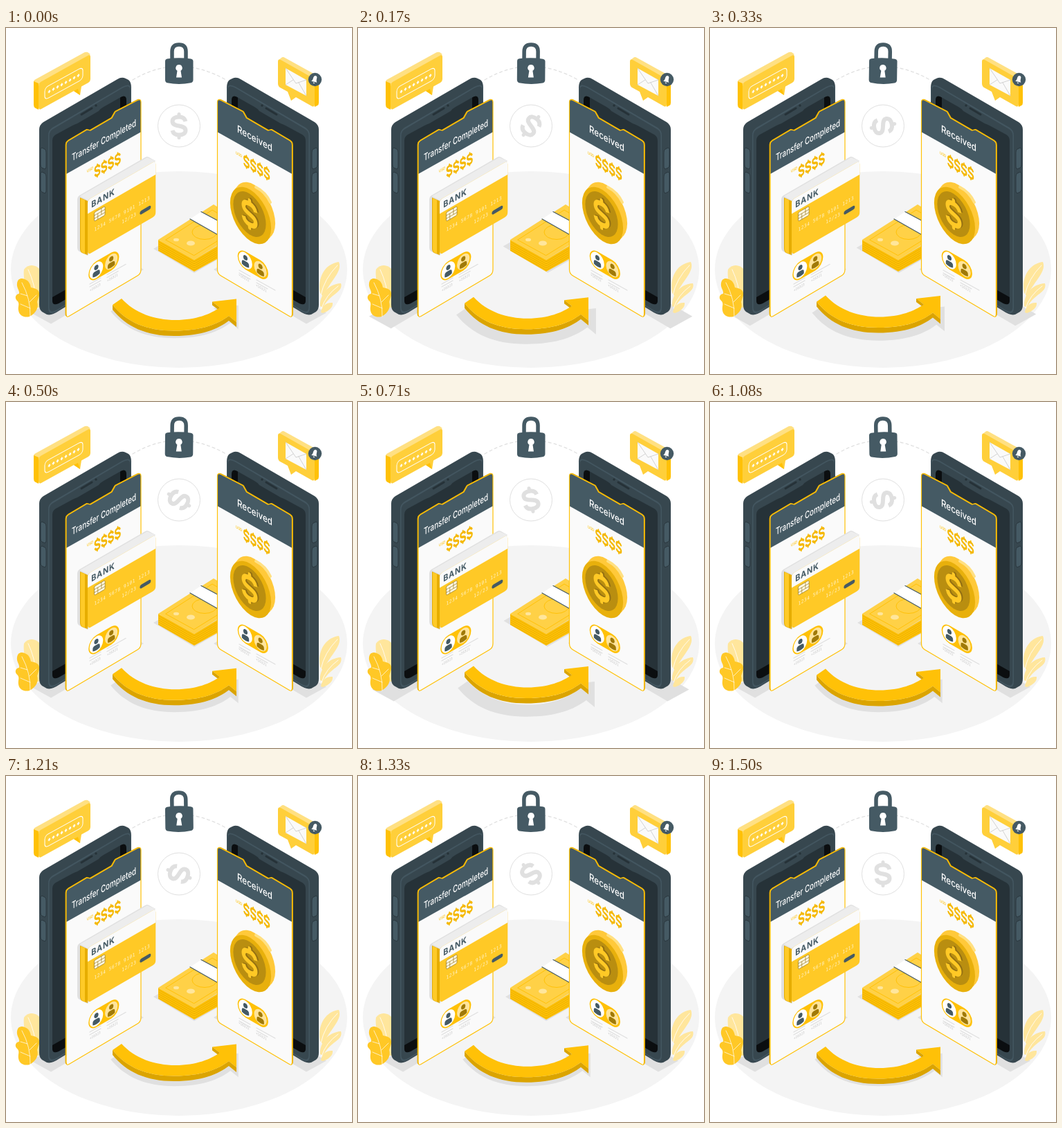
Write an HTML page that moves like this. It is 500x500 px and loops after 1540 ms.

```html
<!DOCTYPE html>
<html lang="en">
<head>
<meta charset="utf-8">
<title>Money transfer</title>
<style>
html, body { margin: 0; width: 100%; height: 100%; overflow: hidden; background: #fff; }
svg { display: block; width: 100vw; height: 100vh; }
text { font-family: Inter, Roboto, sans-serif; font-weight: 500; }
.mono text { font-family: "DejaVu Sans Mono", monospace; font-weight: 400; }
.y { fill: #ffc107; }
.light { fill: #ffcf3a; }
.dk { fill: #455a64; }
.line { fill: none; stroke-linecap: round; stroke-linejoin: round; }
</style>
</head>
<body>
<svg viewBox="0 0 500 500" xmlns="http://www.w3.org/2000/svg">
<defs>
  <g id="dollar" class="line" stroke-width="6">
    <path d="M9.5 -6.5C8.3 -11.5 4.5 -13 0 -13C-6 -13 -9.5 -10.5 -9.5 -6.6C-9.5 -2 -5 -1 0 0C5 1 9.5 2 9.5 6.6C9.5 10.5 6 13 0 13C-4.5 13 -8.3 11.5 -9.5 6.5" stroke-linecap="butt"/>
    <path d="M0 -17V-13M0 13V17" stroke-width="5"/>
  </g>

  <g id="phone">
    <path fill="#37474f" d="M48 147Q48 140 54 136L161 74Q167 70 173 73L177 75Q181 78 181 86V345L76 409Q66 416 59 414L52 410Q48 407 48 400Z"/>
    <path fill="#435660" d="M61 155Q61 148 67 144L168 85Q181 78 181 90V340L74 409Q61 417 61 404Z"/>
    <path fill="#37474f" d="M62.500 156Q62.500 149 68 146L168 87Q180 80 180 91V340L74 407Q62.500 414 62.500 403Z"/>
    <path fill="#263238" d="M67 163Q67 157 72 154L96 141Q100 139 103 138L134 120Q137 116 141 114L164 101Q174 95 174 105V340L76 398Q67 402 67 394Z"/>
    <path fill="#0b0e10" d="M165 100.500Q174 95 174 105V120H165ZM67 389L90 376V390L76 398Q67 402 67 394Z"/>
    <path class="line" stroke="#263238" stroke-width="3" d="M109 125L124 116"/>
    <circle cx="130" cy="112" r="1.700" fill="#263238"/>
    <g fill="#455a64" stroke="#263238" stroke-width=".8">
      <path d="M50 176Q50 172 54 174L56 175Q58 176 58 180V200Q58 205 54 203L52 202Q50 201 50 198Z"/>
      <path d="M50 211Q50 207 54 209L56 210Q58 211 58 215V235Q58 240 54 238L52 237Q50 236 50 233Z"/>
    </g>
  </g>

  <path id="sheet" d="M87 169Q87 165 90 163L117 147L122 148L153 130L158 121L190 104.500Q195 102 195 107V349Q195 355 190 358L91 416.500Q87 419 87 413Z"/>
  <clipPath id="cut"><use href="#sheet"/></clipPath>
  <g id="panel">
    <use href="#sheet" fill="#e0a800" stroke="#e0a800" transform="translate(-.9 -.5)"/>
    <use href="#sheet" fill="#fafafa"/>
    <path class="dk" clip-path="url(#cut)" d="M80 90H200V147.500L80 215Z"/>
    <use href="#sheet" fill="none" stroke="#ffc107" stroke-width="1.200"/>
  </g>

  <g id="bust">
    <circle cy="-4" r="3.600"/>
    <path d="M-6 7.500V4.500Q-6 1 -2.500 1H2.500Q6 1 6 4.500V7.500Q0 10 -6 7.500Z"/>
  </g>
  <g id="pair">
    <rect class="y" x="-13" y="-13" width="51" height="26" rx="13"/>
    <circle r="11.300" fill="#fff"/>
    <circle cx="25" r="10.500" fill="#ffe49a"/>
    <use href="#bust" class="dk"/>
    <use href="#bust" x="25" fill="#a07a08"/>
  </g>

  <path id="arrow" d="M154 400L167 391C186 412 215 422 245 422C275 422 296 413 309 404L298 395.500L333 391.500V425L322 416C306 428 283 437.500 243 437.500C203 437.500 174 425 154 400Z"/>
</defs>

<ellipse cx="250" cy="349" rx="243" ry="142" fill="#f4f4f4"/>
<path class="line" stroke="#e0e0e0" stroke-width="1.300" stroke-dasharray="4 4" d="M183 75Q249 36 318 75"/>

<g id="shade" fill="#e0e0e0">
  <path id="foot" d="M463 411.500L434 427.500L300 349L327 333Z"/>
  <use href="#foot" transform="matrix(-1 0 0 1 499 0)"/>
  <path d="M213 319L272 354L331 320L272 285Z"/>
  <use href="#arrow" transform="matrix(1.030 0 0 1.030 -7.300 -2.500)"/>
</g>

<!-- plants -->
<path fill="#ffe69c" d="M26 349C31 341 43 341 49 349V404H37C31 390 24 362 26 349Z"/>
<path class="line" stroke="#fff" stroke-width=".8" d="M32 349Q42 370 44 395"/>
<g fill="#ffe69c">
  <path d="M454 383C450 361 460 341 481 338C487 352 468 366 458 388Z"/>
  <path d="M454 402C453 386 465 370 484 369C488 382 468 384 458 404Z"/>
  <path d="M455 411C456 402 463 396 472 397C473 404 466 409 458 412Z"/>
</g>
<path class="line" stroke="#fff" stroke-width=".8" d="M479 343Q460 362 455 386M480 373Q462 386 456 405"/>

<use href="#phone"/>
<use href="#phone" transform="matrix(-1 0 0 1 500 0)"/>
<path fill="#ffc826" d="M34 417C27 419 19 416 18 408C17 402 20 399 17 395C12 391 13 385 19 384C20 379 15 376 16 369C17 362 22 361 27 363C33 365 35 370 36 375C40 376 44 376 47 380C50 386 46 391 45 396C47 403 45 411 34 417Z"/>
<path class="line" stroke="#fff" stroke-width=".7" d="M23 368Q36 392 35 417M31 387L21 384M34 396L44 386M35 405L21 399"/>

<!-- cash -->
<path class="y" d="M220 306L272 335L330 300V320L272 352L220 322Z"/>
<path id="edges" class="line" stroke="#e8ae00" stroke-width=".9"/>
<path fill="#ffd147" d="M220 306L300 255L350 286L272 335Z"/>
<g class="line" stroke="#ffc107">
  <path d="M231 306L298 263L339 287L272 328.500Z"/>
  <ellipse cx="287" cy="295" rx="18" ry="10.500"/>
</g>
<ellipse cx="267" cy="311" rx="6" ry="3.600" fill="#ffe69c"/>
<ellipse cx="246" cy="306" rx="4" ry="2.300" fill="#ffe69c"/>
<path fill="#fff" d="M266 276L282 265.500L322 287V308Z"/>
<path class="line" stroke="#455a64" stroke-width="1.200" d="M266 276L310 301M282 265.500L310 280.500"/>

<use href="#panel"/>
<use href="#panel" transform="matrix(-1 0 0 1 500.500 0)"/>
<g fill="#fff" text-anchor="middle" style="font-stretch:condensed">
  <text font-size="14" transform="matrix(.7 -.385 0 1 141.500 167)">Transfer Completed</text>
  <text font-size="14.500" transform="matrix(.8 .45 0 1 359.500 164.500)">Received</text>
</g>
<g class="y" font-size="5.500">
  <text transform="matrix(.8 -.45 0 1 117 209)">USD</text>
  <text transform="matrix(.8 .45 0 1 332 182)">USD</text>
</g>
<g id="sums" stroke="#f5b800"></g>
<use href="#pair" transform="matrix(.866 -.5 0 1 130.500 350)"/>
<use href="#pair" transform="matrix(.866 .5 0 1 346 336)"/>
<path class="line" stroke="#e0e0e0" stroke-width="1.400" d="M121 370L137 361M121 374L137 365M146 356.500L173 341.500M146 360.500L162 351.500M337 350L353 359M337 354L353 363M362 364L389 379M362 368L378 377"/>
<g class="mono" fill="#c4c4c4" font-size="5">
  <text transform="matrix(.866 -.5 0 1 121 381)">+16323</text>
  <text transform="matrix(.866 -.5 0 1 146 367)">+16321</text>
  <text transform="matrix(.866 .5 0 1 336 358)">+16322</text>
  <text transform="matrix(.866 .5 0 1 361 373)">+16321</text>
</g>

<!-- bank card -->
<path fill="#e0e0e0" d="M103 247Q103 244 106 242L201 187Q204 185 207 187L216 192L118 329L106 323Q103 321 103 318Z"/>
<path fill="#ededed" d="M107 243L204 187L216 192L118 249Z"/>
<path fill="#e6ad00" d="M107 245L118 250V328L110 325Q107 323 107 319Z"/>
<path fill="#ffca28" d="M108 246L114 248.500V326L110 324.500Q108 323 108 319Z"/>
<g transform="matrix(.866 -.5 0 1 118 248.500)">
  <rect fill="#ffc926" width="113.500" height="79.500" rx="5"/>
  <path fill="#fafafa" d="M0 20V5Q0 0 5 0H108.500Q113.500 0 113.500 5V20Z"/>
  <text class="dk" x="6" y="14.500" font-size="12.500" letter-spacing=".9" style="font-weight:700">BANK</text>
  <g fill="#fff8e1" stroke="#8a6d14" stroke-width=".6">
    <rect x="11" y="23.500" width="18" height="13" rx="2"/>
    <path fill="none" d="M11 28H29M11 32.500H29M17 28V36.500M23 23.500V32.500"/>
  </g>
  <g class="mono" fill="#fff3cd" font-size="7" letter-spacing=".7">
    <text x="11" y="51">1234 5678 9101 1213</text>
    <text x="57" y="63">12/23</text>
  </g>
  <rect class="dk" x="87" y="60" width="18.500" height="5.500" rx="2.700"/>
</g>

<!-- gold coin -->
<g>
  <circle r="37" fill="#ffc93a" transform="matrix(.8 .5 0 1 359.500 264)"/>
  <circle r="37" fill="#ffc93a" transform="matrix(.8 .5 0 1 356.500 267.500)"/>
  <path class="line" stroke="#ffe082" stroke-width="4" stroke-linecap="butt" d="M361 230Q375 237 382 252"/>
  <circle r="37" fill="#e8b00c" transform="matrix(.8 .5 0 1 353.500 271)"/>
  <g transform="matrix(.8 .5 0 1 352 269)">
    <circle r="29.500" fill="#b98e10"/>
    <use href="#dollar" stroke="#947012" transform="translate(2.500 -2) scale(1.150)"/>
    <use href="#dollar" stroke="#ffc926" transform="scale(1.150)"/>
  </g>
</g>

<g id="float">
  <path fill="#dba400" d="M154 400C174 425 203 437.500 243 437.500C283 437.500 306 428 322 416L333 425V432L322 423C306 435 283 445 243 445C203 445 174 432 154 407Z"/>
  <use href="#arrow" class="y"/>
  <path fill="#dba400" d="M298 395.500L309 404L306 406.500L298 400.500Z"/>
</g>

<!-- password bubble -->
<path fill="#ffe082" d="M40 78Q40 75 43 74L112 36Q115 34 118 35L122 38L47 82Z"/>
<path class="y" d="M40 77L47 80V118L42 115.500Q40 114 40 111Z"/>
<path class="light" d="M47 84Q47 80 50 78L118 40Q122 37 122 42V74Q122 77 119 79L109 84.500L107 97L98 91L51 117Q47 119 47 114Z"/>
<path class="y" d="M98 91L107 97L104 88Z"/>
<g transform="matrix(1 -.55 0 1 47 79)">
  <rect x="9" y="12.500" width="55" height="17.500" rx="5" fill="none" stroke="#fff"/>
  <path id="stars" class="line" stroke="#fff"/>
</g>

<!-- mail bubble -->
<path fill="#ffe082" d="M393 47L398 43Q400 41 403 43L450 69Q452 70 452 73L446 78Z"/>
<path class="y" d="M446 76L452 72V108Q452 111 450 112L446 114Z"/>
<path class="light" d="M393 49Q393 44 397 46L443 72Q446 74 446 78V110Q446 115 442 113L419 100L412 105L407 92L396 86Q393 84 393 80Z"/>
<path fill="#fafafa" d="M404 58L434 75V98L404 82Z"/>
<path class="line" stroke="#c8c8c8" stroke-width=".8" d="M404 58L419 80L434 75M404 82L415 75M434 98L423 79"/>
<circle class="dk" cx="446.500" cy="74.500" r="9.700"/>
<path fill="#fff" transform="translate(446 75) rotate(14) scale(.85 .95) translate(-446 -75)" d="M441 78Q443 77 443 72Q443 68.500 446 68.500Q449 68.500 449 72Q449 77 451 78ZM444.300 79.300H447.700Q446 82 444.300 79.300Z"/>

<g id="lock">
  <path class="line" stroke="#455a64" stroke-width="5.500" stroke-linecap="butt" d="M240 47V34Q240 24 250 24Q260 24 260 34V47"/>
  <path class="dk" d="M230 48Q230 45 233 44.500Q250 42 267 44.500Q270.500 45 270.500 48V75Q270.500 78.500 267 79.300Q250 82.500 233 79.300Q230 78.500 230 75Z"/>
  <path fill="#fff" d="M250 53A4.700 4.700 0 0 1 252.500 61.700L254 71.500H246L247.500 61.700A4.700 4.700 0 0 1 250 53Z"/>
</g>

<circle cx="250" cy="141.500" r="30.500" fill="#fff" stroke="#e0e0e0"/>
<use id="spin" href="#dollar" stroke="#e0e0e0"/>
</svg>
<script>
const el = id => document.getElementById(id);
const LOOP = 1540, STEPS = 36, RATE = 24 / 1000, LEAD = 4;

const repeat = (n, part) => Array.from({ length: n }, (_, i) => part(i)).join('');

el('edges').setAttribute('d', repeat(5, i => {
  const y = 309 + i * 3;
  return `M220.500 ${y}L272 ${y + 28.8}L330 ${y - 5}`;
}));
el('stars').setAttribute('d', repeat(8, i => {
  const x = 15.5 + i * 6;
  return `M${x} 19.500V23.100M${x - 1.4} 20.500L${x + 1.4} 22.100M${x - 1.4} 22.100L${x + 1.4} 20.500`;
}));
const sum = (x, y, dir) => repeat(4, i =>
  `<use href="#dollar" transform="matrix(.35 ${dir * .2} 0 .52 ${x + i * 9.8} ${y + dir * i * 5.5})"/>`);
el('sums').innerHTML = sum(132, 206, -1) + sum(347.5, 193.5, 1);

// Linear interpolation through [progress, value] stops
function track(stops, p) {
  const i = Math.max(1, stops.findIndex(s => s[0] >= p));
  const [a, from] = stops[i - 1], [b, to] = stops[i];
  return from + (to - from) * (p - a) / (b - a);
}
const beat = [[0, 1], [.1, 1.1], [.3, 1], [.4, 1], [.5, 1.1], [.6, 1], [1, 1]];
const rise = [[0, 0], [.5, -10], [1, 0]];
const sway = [[0, 0], [.25, 1], [.75, -1], [1, 0]];

const move = (id, value) => el(id).setAttribute('transform', value);

// The motion runs in whole steps at 24 per second
function draw(ms) {
  const step = Math.floor((ms % LOOP + LEAD) * RATE);
  const p = Math.min(step / STEPS, 1);
  move('shade', `translate(249 357) scale(${track(beat, p)}) translate(-249 -357)`);
  move('float', `translate(0 ${track(rise, p)})`);
  move('lock', `rotate(${track(sway, p)} 250 51)`);
  move('spin', `translate(250 141.500) rotate(${p * 360})`);
}

const start = performance.now();
function tick() {
  draw(performance.now() - start);
  requestAnimationFrame(tick);
}
draw(0);
requestAnimationFrame(tick);
</script>
</body>
</html>
```
